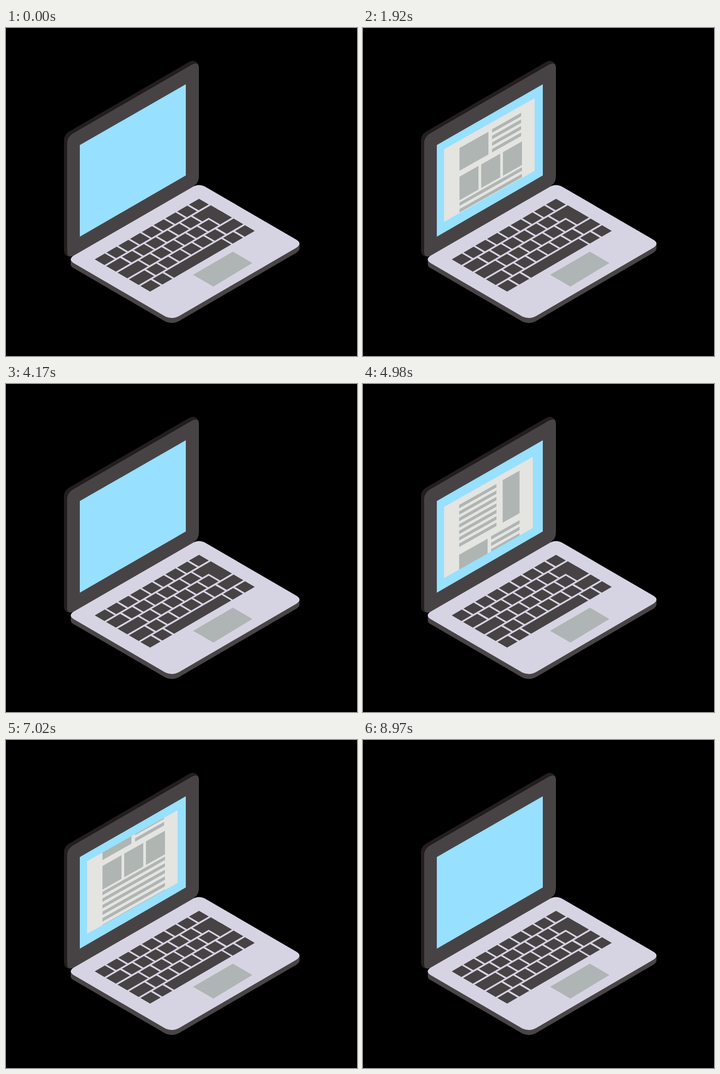
Write an HTML page that moves like this. It is 775 px wide and 723 px high and loops after 9 s.

```html
<!DOCTYPE html>
<html lang="en">
<head>
<meta charset="utf-8">
<title>Laptop</title>
<style>
  html, body { margin: 0; width: 100%; height: 100%; overflow: hidden; background: #000; }
  svg { display: block; width: 100vw; height: 100vh; }
</style>
</head>
<body>
<svg viewBox="0 0 775 723">
  <defs>
    <clipPath id="pageClip"><rect width="200" height="160.5"/></clipPath>
  </defs>

  <!-- lid -->
  <path fill="#231e1d" d="M128 247Q128 235 140 228L404 75Q412 70 419 74L425 80L300 400L146 503Q128 506 128 490Z"/>
  <path fill="#474345" d="M135 254Q135 241 147 233L412 80Q426 74 426 88V326Q426 341 416 347L413 354L150 506L146 503Q135 506 135 494Z"/>
  <path fill="#98e0ff" d="M163 258L397 124V325L163 460Z"/>

  <!-- base -->
  <path fill="#494546" d="M143 510V521Q143 526 149 529L352 647Q367 654 382 646L640 496Q648 491 648 486V476Z"/>
  <path fill="#d6d4e2" d="M149 502L411 351Q425 342 440 350L640 466Q656 475 640 485L382 635Q367 643 352 636L149 518Q137 510 149 502Z"/>
  <path fill="#afb5b4" d="M413 544L501 493L544 518L458 570Z"/>
  <g id="keys" fill="#474345" transform="matrix(1 -.58 1 .582 196 510)"></g>

  <!-- window on the screen -->
  <g id="win">
    <g transform="matrix(1 -.563 0 1 0 -184)" clip-path="url(#pageClip)">
      <rect width="200" height="160.5" fill="#e4e4e1"/>
      <g id="page" fill="#afb5b3"></g>
    </g>
  </g>
</svg>
<script>
const byId = id => document.getElementById(id);
const keys = byId('keys'), page = byId('page'), win = byId('win');

function addRect(parent, x, y, width, height) {
  const rect = document.createElementNS('http://www.w3.org/2000/svg', 'rect');
  Object.entries({ x, y, width, height }).forEach(([k, v]) => rect.setAttribute(k, v));
  parent.appendChild(rect);
}

// Keyboard: each row is a list of [start, end] spans.
const ROW_PITCH = 25.2, KEY_DEPTH = 21.4, KEY_PITCH = 26, KEY_WIDTH = 22.3;
const run = (start, count) => Array.from({ length: count }, (_, i) =>
  [start + i * KEY_PITCH, start + i * KEY_PITCH + KEY_WIDTH]);
const rows = [
  run(0, 9),
  [[0, 31], ...run(35, 6), [191, 231]],
  [[0, 45.5], ...run(49, 6), [205, 231]],
  [[0, 34], ...run(38, 6), [194.5, 231]],
  [[0, 23], [27, 49], [53, 179], [182.5, 205], [209, 231]]
];
rows.forEach((row, r) => row.forEach(([a, b]) =>
  addRect(keys, a, r * ROW_PITCH, b - a, KEY_DEPTH)));
addRect(keys, 205, ROW_PITCH + KEY_DEPTH - 1, 26, 6);

// Page layout
const LINE_PITCH = 14.5, LINE_HEIGHT = 7.6;
function addLines(x, y, width, count) {
  for (let i = 0; i < count; i++) addRect(page, x, y + i * LINE_PITCH, width, LINE_HEIGHT);
}
addLines(34, 15, 84, 7);
addRect(page, 132, 14.5, 38, 95.5);
addRect(page, 34, 127, 64, 50);
addLines(106, 126, 64, 4);
for (let i = 0; i < 3; i++) addRect(page, 34 + i * 48, 190, 42, 52);
addLines(34, 247, 138, 7);

// Timing
const CYCLE = 4500;
const progress = (t, from, to) => Math.min(1, Math.max(0, (t - from) / (to - from)));
const easeOut = u => 1 - (1 - u) ** 2;

function render(now) {
  const t = now % CYCLE;
  const scale = easeOut(progress(t, 0, 560)) - easeOut(progress(t, 3015, 4200));
  const scroll = 196 * progress(t, 600, 2950);
  win.style.display = scale > 0.001 ? '' : 'none';
  win.setAttribute('transform', `translate(179 451) scale(${scale})`);
  page.setAttribute('transform', `translate(0 ${-scroll})`);
}

const start = performance.now();
function tick() {
  render(performance.now() - start);
  requestAnimationFrame(tick);
}
tick();
</script>
</body>
</html>
```
